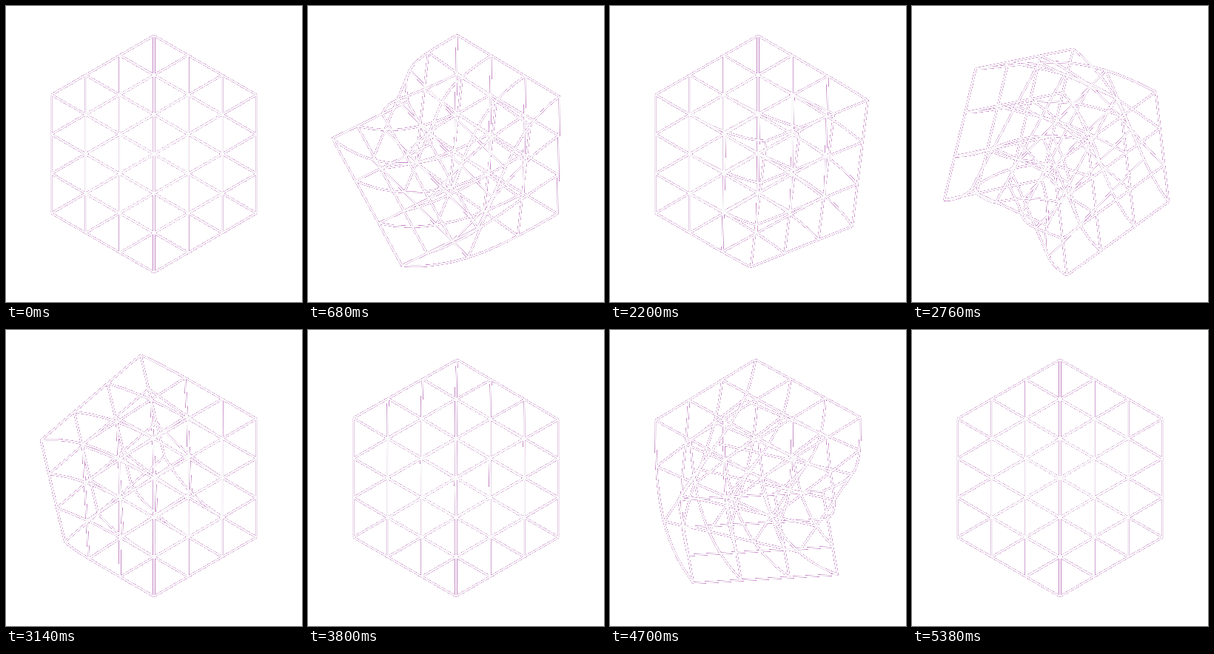
Recreate the animation shown at these times as an HTML page with a canvas. Size 400 by 400 pixels, loop 5.4 s.

```html
<!DOCTYPE html>
<html lang="en">
<head>
<meta charset="utf-8">
<title>Twisting wire cube</title>
<style>
  html, body { margin: 0; width: 100%; height: 100%; overflow: hidden; background: #fff; }
  canvas { display: block; }
</style>
</head>
<body>
<canvas id="stage" width="400" height="400"></canvas>
<script>
const SIZE = 400, HALF = 80, CELLS = 3, STEPS = 24;
const TURN = 1800, LOOP = 3 * TURN;
const START = 50, SPAN = 1240, LAG = 460, POWER = 2.9;
const WIDTH = 2.5, BODY = 250, RIM = [180, 95, 180], CUTOFF = 0.2;

// Screen directions of the cube axes: front left, front right, up
const AXES = [[-Math.sqrt(3) / 2, 0.5], [Math.sqrt(3) / 2, 0.5], [0, -1]];

const out = document.getElementById('stage').getContext('2d');
const layer = document.createElement('canvas');
layer.width = layer.height = SIZE;
const ctx = layer.getContext('2d', { willReadFrequently: true });

function ease(p) {
  if (p <= 0) return 0;
  if (p >= 1) return 1;
  return p < 0.5 ? Math.pow(2 * p, POWER) / 2 : 1 - Math.pow(2 - 2 * p, POWER) / 2;
}

// Lattice lines: direction plus the fixed position on the other two axes
const lines = [];
for (let dir = 0; dir < 3; dir++) {
  for (let i = 0; i <= CELLS; i++) {
    for (let j = 0; j <= CELLS; j++) {
      lines.push({ dir, a: 2 * i / CELLS - 1, b: 2 * j / CELLS - 1 });
    }
  }
}

// Quarter turn about one axis, delayed along that axis
function twist(p, axis, time) {
  const delay = LAG * (1 - p[axis]) / 2;
  const angle = ease((time - START - delay) / SPAN) * Math.PI / 2;
  const u = (axis + 2) % 3, v = (axis + 1) % 3;
  const c = Math.cos(angle), s = Math.sin(angle);
  const pu = p[u], pv = p[v];
  p[u] = pu * c - pv * s;
  p[v] = pv * c + pu * s;
}

function project(p) {
  let x = SIZE / 2, y = SIZE / 2;
  for (let k = 0; k < 3; k++) {
    x += HALF * p[k] * AXES[k][0];
    y += HALF * p[k] * AXES[k][1];
  }
  return [x, y];
}

function drawLine(line, axis, time) {
  const steps = line.dir === axis ? STEPS : 1;
  ctx.beginPath();
  for (let n = 0; n <= steps; n++) {
    const p = [0, 0, 0];
    p[line.dir] = 2 * n / steps - 1;
    p[(line.dir + 1) % 3] = line.a;
    p[(line.dir + 2) % 3] = line.b;
    twist(p, axis, time);
    ctx.lineTo(...project(p));
  }
  ctx.stroke();
}

// Pale lines whose partly covered rim pixels are tinted, with a hard cutoff
function tintRims() {
  const img = ctx.getImageData(0, 0, SIZE, SIZE), d = img.data;
  for (let i = 0; i < d.length; i += 4) {
    const cover = d[i + 3] / 255;
    for (let k = 0; k < 3; k++) {
      d[i + k] = cover < CUTOFF ? 255 : RIM[k] + (BODY - RIM[k]) * cover;
    }
    d[i + 3] = 255;
  }
  out.putImageData(img, 0, 0);
}

function draw(ms) {
  const t = ms % LOOP;
  const axis = Math.floor(t / TURN);
  ctx.clearRect(0, 0, SIZE, SIZE);
  ctx.strokeStyle = '#fff';
  ctx.lineWidth = WIDTH;
  ctx.lineJoin = 'round';
  for (const line of lines) drawLine(line, axis, t % TURN);
  tintRims();
}

const begin = performance.now();
function tick() {
  draw(performance.now() - begin);
  requestAnimationFrame(tick);
}
tick();
</script>
</body>
</html>
```
